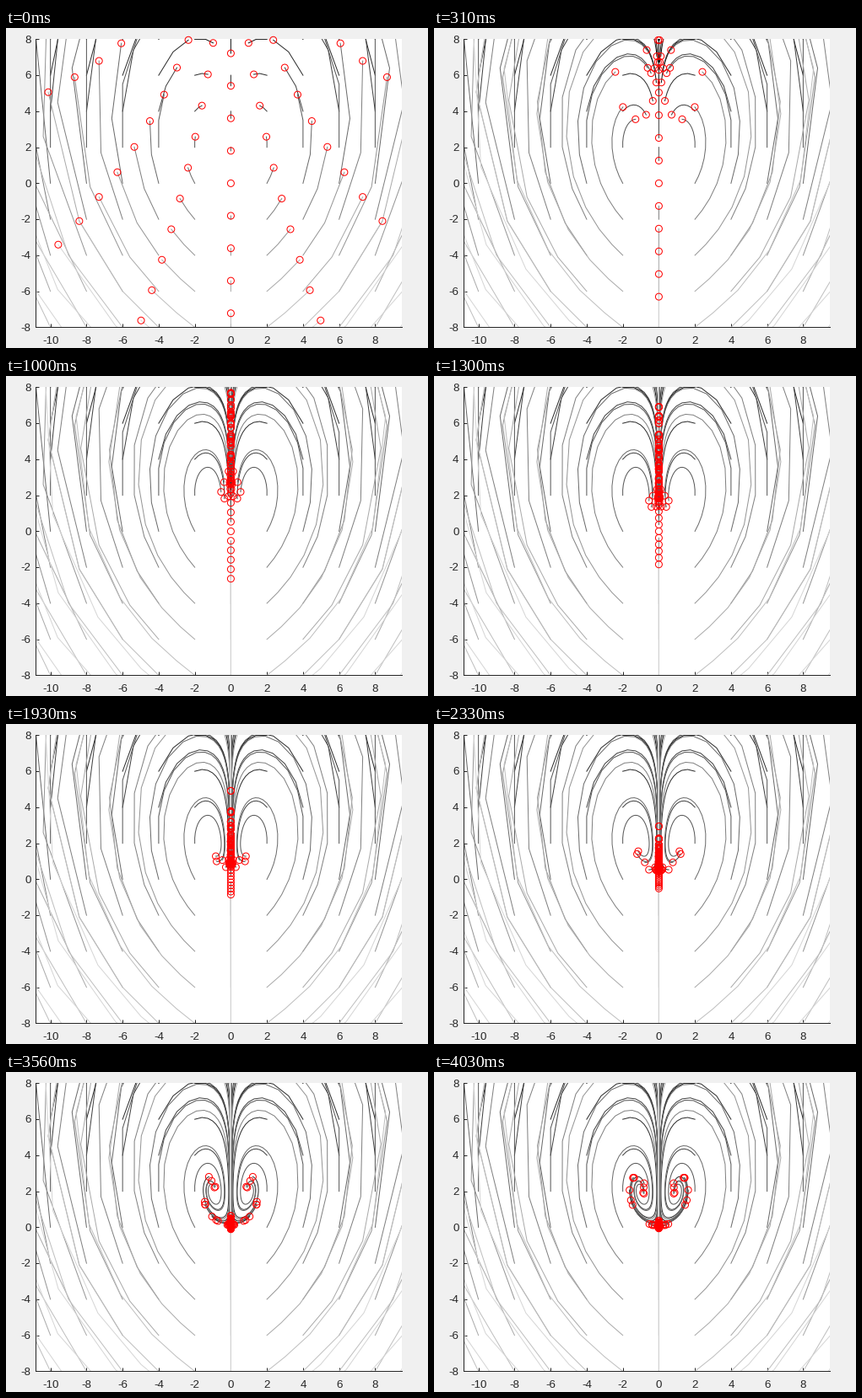
Animation, 500 px wide and 380 px high, one loop 4.33 s. Source, as a matplotlib script:

```python
import numpy as np
import matplotlib.pyplot as plt
from matplotlib.animation import FuncAnimation

W, H, DPI = 500, 380, 100
LOOP, TICK = 4330, 10               # ms
REDRAW, LEAD, LAST = 77.5, 18, 52   # ms between redraws, head start, final one
STEPS_PER_REDRAW = 1.877
DT, STEPS = 0.05, 100

PX = 72 / DPI                       # one pixel in points
LEFT, RIGHT, TOP, BOTTOM = 35.4, 469, 13.4, 355.4
UNIT = (BOTTOM - TOP) / 16
X0, Y0 = 266.4, (TOP + BOTTOM) / 2  # pixel position of the data origin
INK = "#262626"

plt.rcParams["font.family"] = "Liberation Sans"
plt.rcParams["path.simplify"] = False


def integrate():
    """Euler paths of x' = x(2 - y), y' = 2x^2 - y, as [row, col, step, xy]."""
    x, y = np.meshgrid(np.arange(-10.0, 11, 2), np.arange(10.0, -11, -2))
    path = [(x, y)]
    for _ in range(STEPS + 1):
        x, y = x + DT * x * (2 - y), y + DT * (2 * x**2 - y)
        x = np.clip(x, -200, 200)   # the coarse step diverges far off stage
        path.append((x, y))
    return np.array(path).transpose(2, 3, 0, 1)


paths = integrate()
xticks, yticks = range(-10, 9, 2), range(-8, 9, 2)
xlim = ((LEFT - X0) / UNIT, (RIGHT - X0) / UNIT)

fig = plt.figure(figsize=(W / DPI, H / DPI), dpi=DPI, facecolor="#f0f0f0")
ax = fig.add_axes([LEFT / W, 1 - BOTTOM / H,
                   (RIGHT - LEFT) / W, (BOTTOM - TOP) / H])
ax.set(xlim=xlim, ylim=(-8, 8), facecolor="white",
       xticks=xticks, yticks=yticks)
ax.tick_params(direction="in", length=4 * PX, width=PX, color=INK,
               labelbottom=False, labelleft=False)
for side, spine in ax.spines.items():
    spine.set(visible=side in ("left", "bottom"), linewidth=PX, edgecolor=INK)


def label(value, px, py, align):
    fig.text(px / W, 1 - py / H, str(value), ha=align, va="baseline",
             fontsize=13.33 * PX, color=INK)


for v in xticks:
    label(v, X0 + v * UNIT, 375, "center")
for v in yticks:
    label(v, 29.5, Y0 - v * UNIT + 4.2, "right")

rows = [ax.plot([], [], color=str(r / 12), lw=PX)[0]
        for r in range(len(paths))]
# A scatter keeps sub-pixel positions, which plot markers round away.
heads = ax.scatter([], [], s=(8 * PX)**2, facecolors="none", edgecolors="red",
                   linewidths=PX, clip_on=False, zorder=5)


def update(i):
    redraw = min(int((i * TICK + LEAD) / REDRAW), LAST)
    n = 2 + int(STEPS_PER_REDRAW * redraw)
    for line, row in zip(rows, paths):
        part = row[:, :n + 2].copy()
        part[:, n + 1] = np.nan     # lift the pen between paths
        line.set_data(*part.reshape(-1, 2).T)
    points = paths[:, :, n].reshape(-1, 2)
    x, y = points.T
    inside = (x > xlim[0]) & (x < xlim[1]) & (abs(y) <= 8)
    heads.set_offsets(points[inside])
    return [*rows, heads]


anim = FuncAnimation(fig, update, frames=LOOP // TICK, interval=TICK,
                     repeat=True, repeat_delay=0)
plt.show()
```
